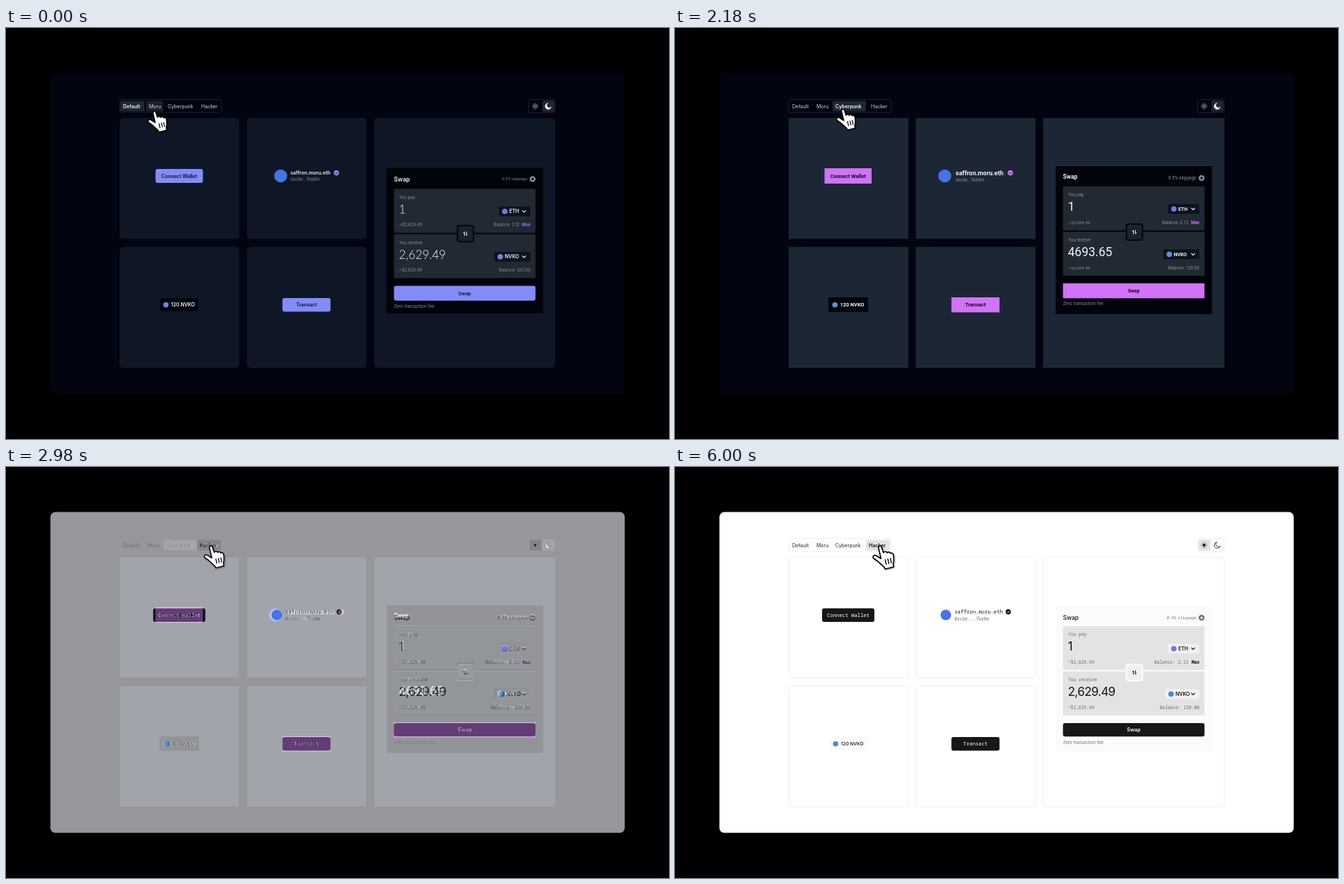
Animation, 951 px wide and 589 px high, one loop 6020 ms. Source, as an HTML page:

```html
<!DOCTYPE html>
<html lang="en">
<head>
<meta charset="utf-8">
<title>Theme switcher</title>
<style>
html, body { margin: 0; height: 100%; background: #000; overflow: hidden; }
svg { display: block; width: 100%; height: 100%; }
text { white-space: pre; }
</style>
</head>
<body>
<svg id="stage" viewBox="0 0 951 589"></svg>
<script>
const LOOP = 6020, FADE = 360;
const INTER = "Inter, sans-serif", MONO = "'Noto Sans Mono', monospace";
const TABS = ["Default", "Moru", "Cyberpunk", "Hacker"];

const dark = {
  page: "#02040f", card: "#0f1626", line: "#1b2230", fg: "#f3f5fa", tab: "#d3d7e0",
  active: "#1f2734", panel: "#02040c", input: "#212933", pill: "#0c121e", muted: "#8b919c",
  mid: "#1b222d", midLine: "#02040c", chip: "#02040c", round: 5, font: INTER, body: INTER,
  numFont: "Lato, sans-serif", numWeight: 300, numSize: 17.2, track: 0, amount: "2,629.49",
  label: 7, name: 7, small: 6, slip: 5.3, coin: "#5a94dc", avatarR: 9.3
};

const themes = [
  { ...dark, accent: "#818cf8", onAccent: "#0b1024", tabX: [168, 205, 232, 280], hi: [164, 34.5], end: 309,
    connect: [214.5, 202, 68, 20], transact: [396.5, 387, 69, 19.5], avatar: 394, nameX: 408, badge: 474,
    panelBox: [545.5, 200.5, 225, 208.5], title: 216.5, gear: 216.5, top: 230.5, swap: [369.5, 21.3], fee: 399,
    hover: [201, 24.5], coin: "#6f87e4" },
  { ...dark, accent: "#0052ff", onAccent: "#fff", tabX: [168, 203, 231, 279], hi: [199, 26], end: 308,
    connect: [214.5, 206, 68, 19.5], transact: [396.5, 387, 69, 19.5], avatar: 393, nameX: 409, badge: 475,
    panelBox: [546, 198.5, 224, 211.5], title: 215, gear: 215, top: 227, swap: [366, 21.3], fee: 395 },
  { ...dark, card: "#1c2635", accent: "#d073f7", onAccent: "#160d20", tabX: [168, 203, 230, 281], hi: [226, 48], end: 310,
    connect: [214.5, 201, 67.5, 22], transact: [396.5, 386, 69, 21.5], avatar: 387, nameX: 402.5, badge: 481,
    panelBox: [546, 198, 224.5, 212], title: 213, gear: 215, top: 227, swap: [366, 21.3], fee: 395,
    round: 0, body: "Roboto, sans-serif", numFont: "Roboto, sans-serif", numWeight: 400, numSize: 17.5,
    amount: "4693.65", label: 7.5, name: 9, small: 6.3, slip: 6.5 },
  { page: "#fff", card: "#fff", line: "#efeff1", fg: "#141417", tab: "#222228", active: "#e2e3e8",
    panel: "#fafbfa", input: "#e3e3e3", pill: "#f1f1f2", muted: "#6d6d70", mid: "#f0f0f0", midLine: "#fff",
    chip: "#fafafa", accent: "#17171a", onAccent: "#fff", light: true, tabX: [168, 203, 230, 278], hi: [274, 34], end: 309,
    connect: [211, 202.5, 75, 19.5], transact: [396.5, 387, 69, 19.5], avatar: 388.5, nameX: 401, badge: 478,
    panelBox: [546, 199.5, 225, 209.5], title: 216, gear: 216, top: 228, swap: [367, 19.2], fee: 394.5,
    round: 5, font: INTER, body: MONO, numFont: INTER, numWeight: 400, numSize: 17.3, track: -0.7,
    amount: "2,629.49", label: 7.25, name: 7.2, small: 6.3, slip: 5.4, coin: "#4d87dc", avatarR: 7.6 }
];

const rect = (x, y, w, h, fill, r = 0, stroke = "none") =>
  `<rect x="${x}" y="${y}" width="${w}" height="${h}" rx="${r}" fill="${fill}" stroke="${stroke}"/>`;
const disc = (x, y, r, fill) => `<circle cx="${x}" cy="${y}" r="${r}" fill="${fill}"/>`;
const path = (d, stroke, width = 1, fill = "none") =>
  `<path d="${d}" stroke="${stroke}" stroke-width="${width}" fill="${fill}" stroke-linecap="round" stroke-linejoin="round"/>`;
// y is the middle of the capitals
const text = (x, y, s, size, fill, { font = INTER, weight = 400, anchor = "start", track = 0 } = {}) =>
  `<text x="${x}" y="${y + size * 0.36}" font-family="${font}" font-size="${size}" font-weight="${weight}" ` +
  `fill="${fill}" text-anchor="${anchor}" letter-spacing="${track}">${s}</text>`;

function button(t, [x, y, w, h], label, size = t.label, font = t.body) {
  return rect(x, y, w, h, t.accent, t.round && 3) +
    text(x + w / 2, y + h / 2, label, size, t.onAccent, { font, weight: font === MONO ? 500 : 600, anchor: "middle" });
}

function header(t, index) {
  let s = rect(163, 102.5, t.end - 163, 18.5, t.page, 2, t.line);
  if (t.hover) s += rect(t.hover[0], 104.5, t.hover[1], 15, "#1a212d", 1.5);
  s += rect(t.hi[0], 104.5, t.hi[1], 15, t.active, 1.5);
  TABS.forEach((name, i) => {
    const on = i === index;
    s += text(t.tabX[i], 112, name, 7, on ? t.fg : t.tab, { weight: on ? 600 : 400 });
  });
  s += rect(749.5, 102.5, 38, 19, t.page, 2, t.line);
  s += rect(t.light ? 751 : 769.5, 104, 17, 16, t.active, 1.5);
  let rays = "";
  for (let i = 0; i < 8; i++) {
    const a = i * Math.PI / 4, c = Math.cos(a), n = Math.sin(a);
    rays += `M${759 + 3.4 * c} ${112 + 3.4 * n}L${759 + 4.1 * c} ${112 + 4.1 * n}`;
  }
  s += path(rays, t.fg, 0.8);
  s += `<circle cx="759" cy="112" r="1.8" stroke="${t.fg}" stroke-width=".8" fill="${t.light ? t.fg : "none"}"/>`;
  return s + path("M776.8 107.8A4.4 4.4 0 1 0 782 113.4A3.8 3.8 0 0 1 776.8 107.8Z", t.fg, 0.8, t.light ? "none" : t.fg);
}

function amountBox(t, y, label, value, token, coin, pillX, balance) {
  const muted = { font: t.body }, mid = y + 32.3;
  return rect(556.5, y, 203, 63, t.input, t.round && 2) +
    text(564, y + 12, label, t.small, t.muted, muted) +
    text(563.5, y + 29, value, t.numSize, t.fg, { font: t.numFont, weight: t.numWeight, track: t.track }) +
    text(564, y + 51.3, "~$2,629.49", t.small - 0.1, t.muted, muted) +
    rect(pillX, mid - 7, 752 - pillX, 14, t.pill, 2.5) +
    disc(pillX + 8.5, mid, 3.9, coin) +
    text(pillX + 15, mid, token, 7, t.fg, { font: t.body === MONO ? INTER : t.body, weight: 600 }) +
    path(`M740.8 ${mid - 1.2}l2.4 2.4 2.4-2.4`, t.fg, 1.1) +
    text(balance === "2.12" ? 736.5 : 752, y + 51.3, "Balance: " + balance, t.small, t.muted, { font: t.body, anchor: "end" });
}

function swapPanel(t) {
  const [x, y, w, h] = t.panelBox, midY = t.top + 65 + (t.light ? 1.5 : 0.5) - (t.hover ? 1.3 : 0);
  return rect(x, y, w, h, t.panel, t.round && 2) +
    text(556.5, t.title, "Swap", 8.5, t.fg, { font: t.body === MONO ? INTER : t.body, weight: t.light ? 500 : 600 }) +
    text(747.5, t.gear, "0.5% slippage", t.slip, t.muted, { font: t.body, anchor: "end" }) +
    `<g fill="none" stroke="${t.muted}"><circle cx="755.3" cy="${t.gear}" r="2.7" stroke-width="2"/>` +
    `<circle cx="755.3" cy="${t.gear}" r="3.9" stroke-width="1.2" stroke-dasharray="1.53"/></g>` +
    amountBox(t, t.top, "You pay", "1", "ETH", "#7079df", 707, "2.12") +
    text(752.3, t.top + 51.3, "Max", t.small, t.light ? t.fg : t.accent, { font: t.body, weight: 600, anchor: "end" }) +
    amountBox(t, t.top + 65, "You receive", t.amount, "NVKO", t.coin, t.light ? 703 : 700.5, "120.00") +
    `<g transform="translate(659 ${midY})">` +
    `<rect x="-11.5" y="-11.5" width="23" height="23" rx="3" fill="${t.mid}" stroke="${t.midLine}" stroke-width="2"/>` +
    path("M-1.4 2.7V-2.5L-2.9-.9M1.3-2.7V2.5L2.8.9", t.fg, 1) + "</g>" +
    button(t, [556.5, t.swap[0], 203, t.swap[1]], "Swap", t.light ? 7.3 : 6.8, t.light ? INTER : t.body) +
    text(556.5, t.fee, "Zero transaction fee", 6.1, t.muted);
}

function layer(t, index) {
  const r = t.round, edge = t.light ? t.line : "none";
  let s = rect(63.7, 64.6, 823.8, 459.6, t.page, 7) + header(t, index);
  for (const cx of [163, 345.5])
    for (const cy of [129, 313.7]) s += rect(cx, cy, 171.7, 173.3, t.card, r, edge);
  s += rect(528, 129, 260, 358, t.card, r, edge);
  s += button(t, t.connect, "Connect Wallet") + button(t, t.transact, "Transact");

  s += disc(t.avatar, 212, t.avatarR, "#4673e8");
  s += text(t.nameX, 207.7, "saffron.moru.eth", t.name, t.fg, { font: t.body, weight: t.light ? 500 : 600 });
  s += text(t.nameX, 217.3, "0xc6e...7ka9m", t.small, t.muted, { font: t.body });
  s += disc(t.badge, 207.6, 3.8, t.accent);
  s += path(`M${t.badge - 1.6} 207.8l1.2 1.2 2.2-2.5`, index === 1 || t.light ? "#fff" : t.card, 0.9);

  s += index === 2 ? rect(220, 386, 57, 21, t.chip) : rect(221, 387.3, 55, 18.4, t.chip, 3);
  s += disc(t.light ? 230.4 : 229.4, 396.7, 3.8, t.coin);
  s += text(t.light ? 238 : 236.7, 396.6, "120 NVKO", t.light ? 6.7 : t.label, t.fg,
    { font: t.body === MONO ? INTER : t.body, weight: t.light ? 500 : 600 });
  s += swapPanel(t);
  return `<g class="layer">${s}</g>`;
}

const hand = path("M.5 3.5C0-.5 4-1 5 2.5L7.5 10C9 8 12 8 12.8 10.2C14.5 8.3 17 9 17.5 11C19.5 9.6 21.5 11 21.8 13.5" +
  "C22.5 19 23 21 21.5 26L22 30.5L10 33.5L8.5 30.5C5 28 2 23.5-6 18.5C-9 16-6.5 12.5-3.5 14C-1 15 1 17 4 18.5Z", "#000", 1.6, "#fff") +
  path("M10 20l1.5 6.5M13.8 19l1.5 6.5M17.5 18.2l1.3 6.3", "#000", 1.4);
const arrow = path("M0 0V30L6.5 24.5 11 35.5 17.5 33 12.5 22.5H22Z", "#fff", 2, "#000");

const stage = document.getElementById("stage");
stage.innerHTML = themes.map(layer).join("") +
  `<g id="cursor" style="filter:drop-shadow(1px 1.5px 1px rgba(0,0,0,.4))"><g id="hand">${hand}</g><g id="arrow">${arrow}</g></g>`;
const layers = stage.querySelectorAll(".layer");
const [cursor, handEl, arrowEl] = ["cursor", "hand", "arrow"].map(id => document.getElementById(id));

const ease = (t, from, to) => {
  const p = Math.min(1, Math.max(0, (t - from) / (to - from)));
  return p * p * (3 - 2 * p);
};

const fadeStart = [0, 840, 1810, 2780];

function draw(now) {
  const t = now % LOOP;
  layers.forEach((el, i) => { if (i) el.setAttribute("opacity", ease(t, fadeStart[i], fadeStart[i] + FADE)); });

  const settle = ease(t, 1240, 1500), first = ease(t, 1540, 1780), second = ease(t, 2460, 2720);
  const x = 210.5 + 2 * settle + 26 * first + 53 * second;
  const y = 119 - 2.3 * settle - 0.7 * first - 3.2 * second;
  const moving = (t >= 1480 && t < 1780) || (t >= 2460 && t < 2720);
  const size = 0.9 + 0.1 * ease(t, 2900, 3060);
  cursor.setAttribute("transform", `translate(${x} ${y})`);
  handEl.setAttribute("transform", `scale(${size})`);
  handEl.setAttribute("visibility", moving ? "hidden" : "visible");
  arrowEl.setAttribute("visibility", moving ? "visible" : "hidden");
}

let start;
function tick(now) {
  start ??= now;
  draw(now - start);
  requestAnimationFrame(tick);
}
draw(0);
requestAnimationFrame(tick);
</script>
</body>
</html>
```
